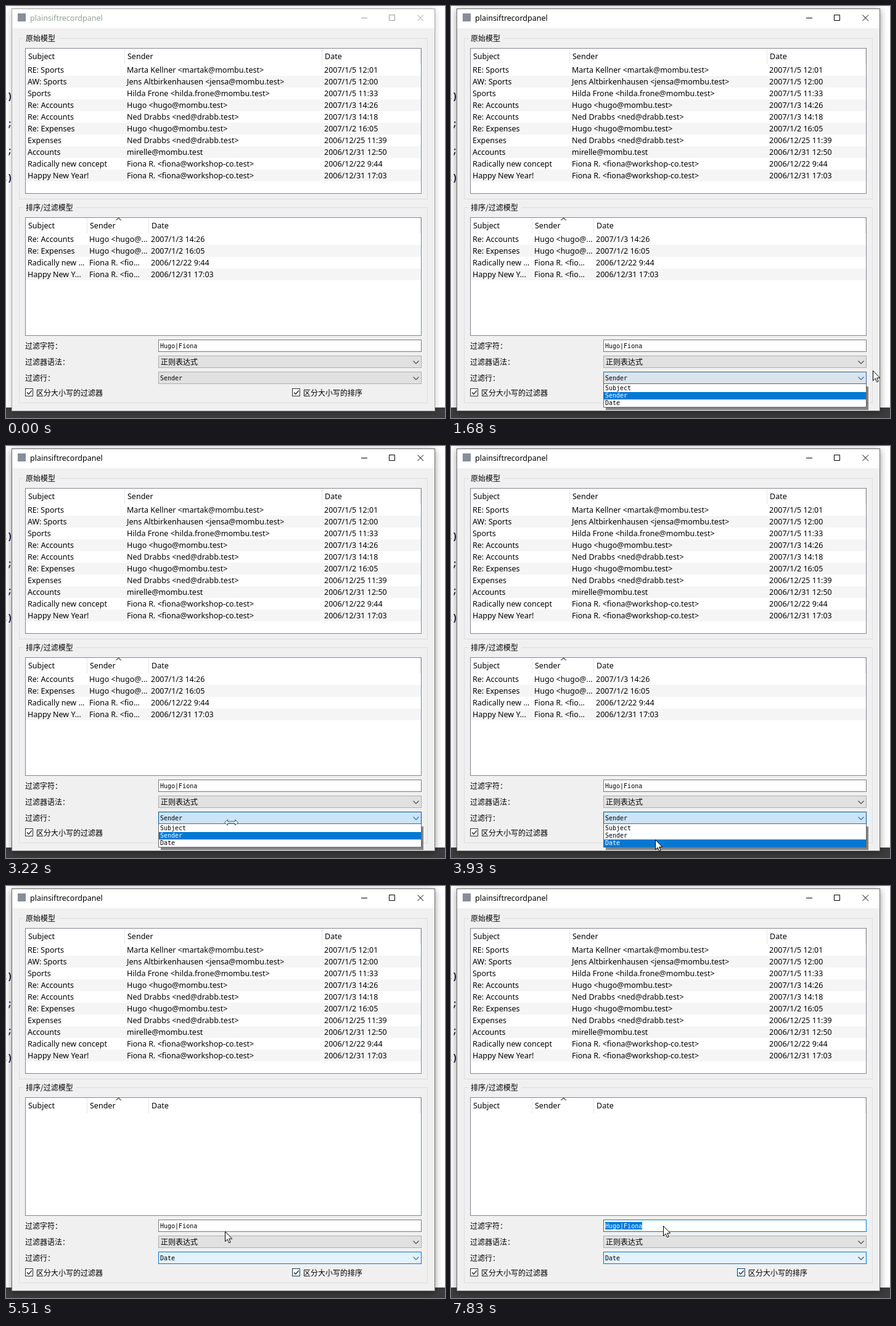
An HTML page that plays this animation: 712x667 px, repeating every 8000 ms.

```html
<!DOCTYPE html>
<html lang="zh-CN">
<head>
<meta charset="utf-8">
<title>Filter window</title>
<style>
html, body { margin: 0; width: 100%; height: 100%; overflow: hidden; background: #fff; }
svg { display: block; width: 712px; height: 667px; }
text { font: 12.5px "Noto Sans", "Open Sans", sans-serif; fill: #000; white-space: pre; }
.zh { font: 12px "Noto Sans CJK SC", "Noto Sans CJK", sans-serif; }
.mono { font: 10px "DejaVu Sans Mono", monospace; }
.code text { font: bold 14px "Liberation Mono", monospace; fill: #101048; }
.line { fill: none; stroke: #dcdcdc; }
.view { fill: #fff; stroke: #828790; }
.head { stroke: #e5e5e5; }
.tick { fill: none; stroke: #222; stroke-width: 1.3; }
.chev { fill: none; stroke: #444; stroke-width: 1.1; }
.box { fill: #fff; stroke: #333; }

svg, svg .anim { animation: 8s step-end infinite; }
svg { animation-name: win; }
.frame { fill: #f0f0f0; stroke: var(--edge); filter: drop-shadow(0 2px 6px rgba(0,0,0,var(--glow))); }
.title { fill: var(--ink); }
.sys { fill: none; stroke: var(--sys); }
.combo { animation-name: combo !important; }
.pop { animation-name: pop !important; }
.bar { animation-name: bar !important; }
.before { animation-name: before !important; }
.after { animation-name: after !important; }
.edit { animation-name: edit !important; }
.sel { animation-name: sel !important; }
.query { animation-name: query !important; }
.caret { animation-name: caret !important; }
.hot { animation-name: hot !important; }
.arrow { animation-name: path, arrow !important; }
.ns { animation-name: ns !important; }
.ew { animation-name: ew !important; }
.row1 { animation-name: row1 !important; }
.row2 { animation-name: row2 !important; }
.tip { animation-name: tip !important; }

@keyframes win {
  0%, 24.75% { --ink: #92a294; --sys: #999; --edge: #a4a4a4; --glow: .22; }
  11.375%, 35.375% { --ink: #000; --sys: #000; --edge: #6c6c6c; --glow: .42; }
}
@keyframes combo {
  0% { fill: #e1e1e1; stroke: #adadad; }
  11.375% { fill: #dae4ec; stroke: #2c6595; }
  24.75% { fill: #d5e0e9; stroke: #5f8aad; }
  38.375% { fill: #cce4f7; stroke: #005499; }
  59% { fill: #e5f1fb; stroke: #0078d7; }
}
@keyframes tip { 0%, 77.5% { stroke: #444; } 11.375%, 59% { stroke: #2a6da5; } }
@keyframes pop { 0%, 24.75%, 59% { opacity: 0; } 12.25%, 38.375% { opacity: 1; } }
@keyframes bar { 0% { transform: translateY(0); } 49.125% { transform: translateY(12px); } }
@keyframes row1 { 0% { fill: #fff; } 49.125% { fill: #000; } }
@keyframes row2 { 0% { fill: #000; } 49.125% { fill: #fff; } }
@keyframes before { 0% { opacity: 1; } 59% { opacity: 0; } }
@keyframes after { 0% { opacity: 0; } 59% { opacity: 1; } }
@keyframes hot { 0% { stroke: #333; } 59% { stroke: #0a3a68; } }
@keyframes edit { 0% { stroke: #7a7a7a; } 77.5% { stroke: #0078d7; } }
@keyframes sel { 0% { opacity: 0; } 81.5% { opacity: 1; } }
@keyframes query { 0% { fill: #000; } 81.5% { fill: #fff; } }
@keyframes caret { 0%, 85.5%, 97.875% { opacity: 0; } 77.5%, 91.25% { opacity: 1; } }
@keyframes arrow { 0%, 16.25%, 42.125% { opacity: 1; } 14.25%, 39.375% { opacity: 0; } }
@keyframes ns { 0%, 16.25% { opacity: 0; } 14.25% { opacity: 1; } }
@keyframes ew { 0%, 42.125% { opacity: 0; } 39.375% { opacity: 1; } }
@keyframes path {
  0% { transform: translate(556px, 670px); }
  .875% { transform: translate(556px, 652px); animation-timing-function: steps(5); }
  5.5% { transform: translate(312px, 592px); animation-timing-function: steps(2); }
  7.4% { transform: translate(326px, 563px); animation-timing-function: steps(3); }
  10.25% { transform: translate(347px, 600px); }
  11.375% { transform: translate(350px, 604px); }
  16.25% { transform: translate(372px, 607px); animation-timing-function: steps(5); }
  21% { transform: translate(684px, 590px); }
  21.875% { transform: translate(692px, 530px); }
  22.875% { transform: translate(730px, 460px); }
  28.75% { transform: translate(708px, 480px); animation-timing-function: steps(6); }
  34.5% { transform: translate(362px, 604px); }
  42.125% { transform: translate(360px, 607px); animation-timing-function: steps(5); }
  47.25% { transform: translate(334px, 630px); }
  49.125% { transform: translate(331px, 637px); }
  51% { transform: translate(327px, 633px); }
  53.125% { transform: translate(321px, 632px); }
  59% { transform: translate(326px, 638px); }
  61% { transform: translate(328px, 640px); }
  62.875% { transform: translate(329px, 636px); animation-timing-function: steps(6); }
  68.875% { transform: translate(355px, 559px); }
  72.75% { transform: translate(350px, 557px); }
  75.625% { transform: translate(348px, 555px); animation-timing-function: steps(4); }
  79.375%, 100% { transform: translate(344px, 550px); }
}
</style>
</head>
<body>
<svg viewBox="0 0 712 667">
  <rect width="712" height="667" fill="#fff"/>
  <rect y="650" width="712" height="17" fill="#3c3c3e"/>
  <g class="code">
    <text x="-6.5" y="151">t)</text><text x="2" y="195">;</text>
    <text x="2" y="239">;</text><text x="-6.5" y="283">t)</text>
  </g>

  <rect class="frame" x="9.5" y="4.5" width="686" height="651"/>
  <rect x="10" y="5" width="685" height="31" fill="#fff"/>
  <rect x="19" y="12" width="13" height="13" fill="#858d9b"/>
  <text class="title" x="39" y="24">plainsiftrecordpanel</text>
  <path class="sys" d="M576 19.5h10M621.5 14.5h9v9h-9zM667.5 14.5l9.5 9.5M677 14.5l-9.5 9.5"/>

  <path class="line" d="M28 52.5H21.5V312.5H683.5V52.5H86M28 326.5H21.5V642.5H683.5V326.5H114"/>
  <text class="zh" x="32" y="57">原始模型</text>
  <text class="zh" x="32" y="331">排序/过滤模型</text>
  <rect class="view" x="31.5" y="68.5" width="642" height="235"/>
  <rect class="view" x="31.5" y="342.5" width="642" height="191"/>
  <path class="head" d="M192.5 69v25M512.5 69v25M672.5 69v25M131.5 343v25M231.5 343v25M672.5 343v25"/>
  <path class="chev" d="M178.5 347l4-4 4 4"/>
  <g id="all"></g>
  <g id="found" class="anim before"></g>
  <g id="heads"></g>

  <text class="zh" x="31" y="555">过滤字符：</text>
  <text class="zh" x="31" y="581">过滤器语法：</text>
  <text class="zh" x="31" y="607">过滤行：</text>

  <rect class="anim edit" x="247.5" y="540.5" width="426" height="19" fill="#fff"/>
  <rect class="anim sel" x="250" y="544" width="60" height="12" fill="#0078d7"/>
  <text class="mono anim query" x="250" y="554">Hugo|Fiona</text>
  <rect class="anim caret" x="310" y="544" width="1" height="12"/>

  <rect x="247.5" y="566.5" width="426" height="19" fill="#e1e1e1" stroke="#adadad"/>
  <text class="zh" x="251" y="581">正则表达式</text>
  <path class="chev" d="M660.5 574.5l4.5 4.5 4.5-4.5"/>
  <rect class="anim combo" x="247.5" y="592.5" width="426" height="19"/>
  <text class="mono anim before" x="250" y="606">Sender</text>
  <text class="mono anim after" x="250" y="606">Date</text>
  <path class="chev anim tip" d="M660.5 600.5l4.5 4.5 4.5-4.5"/>

  <rect class="box" x="31.5" y="619.5" width="12" height="12"/>
  <path class="tick" d="M34 625.5l2.8 3 5-6"/>
  <text class="zh" x="49" y="631">区分大小写的过滤器</text>
  <rect class="box anim hot" x="464.5" y="619.5" width="12" height="12"/>
  <path class="tick" d="M467 625.5l2.8 3 5-6"/>
  <text class="zh" x="482" y="631">区分大小写的排序</text>

  <g class="anim pop">
    <path d="M251 650h423v-34h3v38H251z" fill="#000" opacity=".45"/>
    <rect x="247.5" y="611.5" width="426" height="38" fill="#fff" stroke="#646464"/>
    <rect class="anim bar" x="248" y="625" width="425" height="12" fill="#0078d7"/>
    <text class="mono" x="250" y="622">Subject</text>
    <text class="mono anim row1" x="250" y="634">Sender</text>
    <text class="mono anim row2" x="250" y="646">Date</text>
  </g>

  <g fill="#fff" stroke="#000">
    <path class="anim arrow" d="M.5.5v16l3.7-3.5 2.6 5.8 2.4-1.1-2.5-5.6h5z"/>
    <path class="anim ns" d="M352.5 594.5l4.5 5h-3v11h3l-4.5 5-4.5-5h3v-11h-3z"/>
    <path class="anim ew" stroke="#24506f" d="M354.5 609.5l5-4.5v3h12v-3l5 4.5-5 4.5v-3h-12v3z"/>
  </g>
</svg>
<script>
const mails = [
  ["RE: Sports", "Marta Kellner <martak@mombu.test>", "2007/1/5 12:01"],
  ["AW: Sports", "Jens Altbirkenhausen <jensa@mombu.test>", "2007/1/5 12:00"],
  ["Sports", "Hilda Frone <hilda.frone@mombu.test>", "2007/1/5 11:33"],
  ["Re: Accounts", "Hugo <hugo@mombu.test>", "2007/1/3 14:26"],
  ["Re: Accounts", "Ned Drabbs <ned@drabb.test>", "2007/1/3 14:18"],
  ["Re: Expenses", "Hugo <hugo@mombu.test>", "2007/1/2 16:05"],
  ["Expenses", "Ned Drabbs <ned@drabb.test>", "2006/12/25 11:39"],
  ["Accounts", "mirelle@mombu.test", "2006/12/31 12:50"],
  ["Radically new concept", "Fiona R. <fiona@workshop-co.test>", "2006/12/22 9:44"],
  ["Happy New Year!", "Fiona R. <fiona@workshop-co.test>", "2006/12/31 17:03"]
];
const found = [
  ["Re: Accounts", "Hugo <hugo@...", mails[3][2]],
  ["Re: Expenses", "Hugo <hugo@...", mails[5][2]],
  ["Radically new ...", "Fiona R. <fio...", mails[8][2]],
  ["Happy New Y...", "Fiona R. <fio...", mails[9][2]]
];
const make = (parent, tag, attrs, text = "") => {
  const el = document.createElementNS("http://www.w3.org/2000/svg", tag);
  for (const k in attrs) el.setAttribute(k, attrs[k]);
  el.textContent = text;
  parent.append(el);
};
const table = (id, rows, cols, top) => {
  const g = document.getElementById(id);
  rows.forEach((row, i) => {
    const y = top + i * 19;
    if (i % 2) make(g, "rect", { x: 32, y, width: 641, height: 19, fill: "#f5f5f5" });
    row.forEach((s, c) => make(g, "text", { x: cols[c], y: y + 14 }, s));
  });
};
const names = [["Subject", "Sender", "Date"]];
table("all", mails, [35, 196, 516], 94);
table("found", found, [35, 135, 235], 368);
table("heads", names, [36, 197, 517], 72);
table("heads", names, [36, 136, 236], 346);
</script>
</body>
</html>
```
